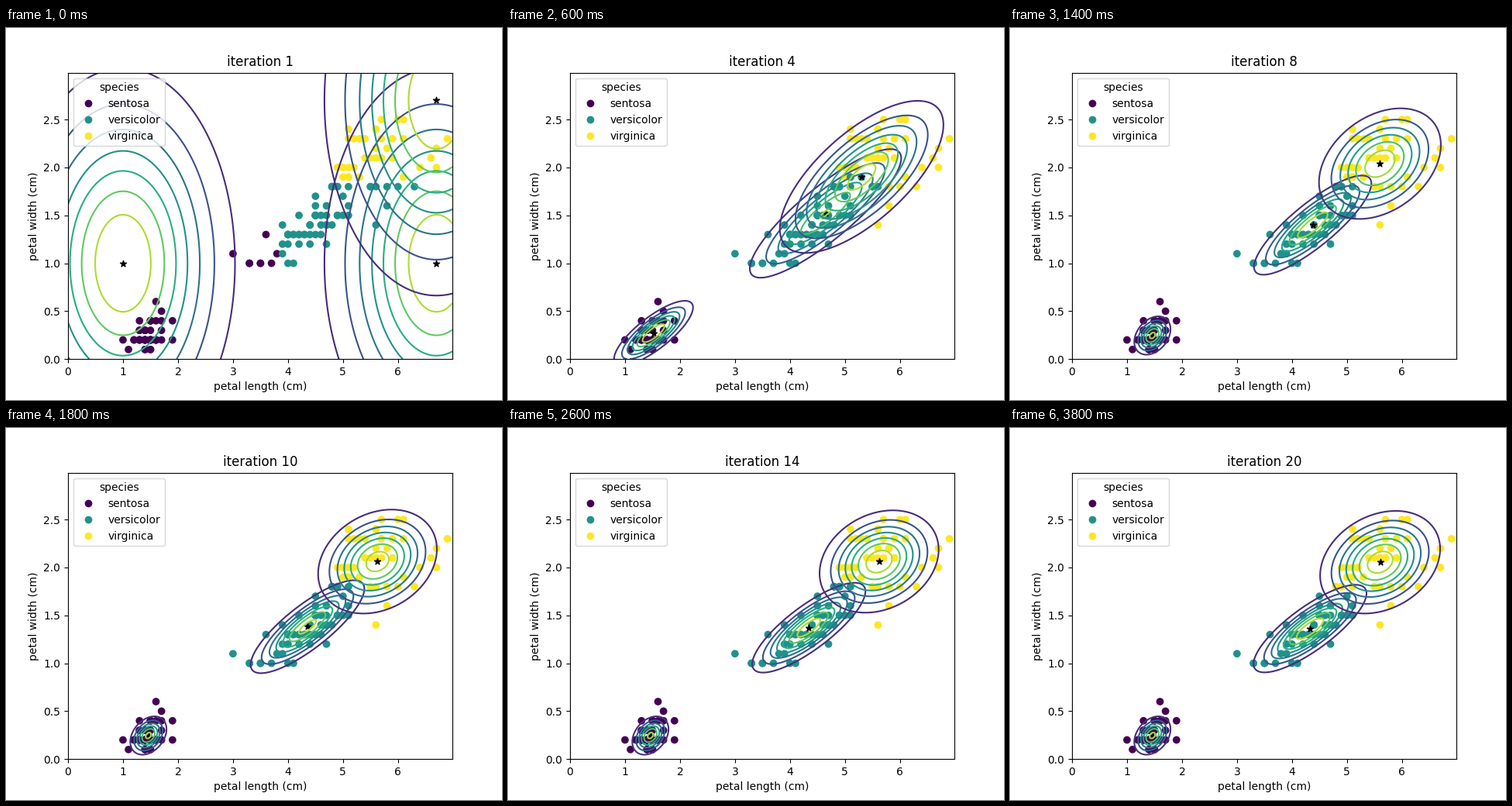
Animation, 640 px wide and 480 px high, one loop 4 s. Source, as a matplotlib script:

```python
import numpy as np
import matplotlib.pyplot as plt
from matplotlib.animation import FuncAnimation

STEPS = 20
NAMES = ["sentosa", "versicolor", "virginica"]

# petal length -> petal widths, both in millimetres
SENTOSA = {
    10: [2], 11: [1], 12: [2] * 2, 13: [2] * 4 + [3, 3, 4],
    14: [1] * 2 + [2] * 8 + [3] * 3, 15: [1] * 2 + [2] * 7 + [3] + [4] * 3,
    16: [2] * 5 + [4, 6], 17: [2, 3, 4, 5], 19: [2, 4],
}
VERSICOLOR = {
    30: [11], 33: [10] * 2, 35: [10] * 2, 36: [13], 37: [10], 38: [11],
    39: [11, 12, 14], 40: [10, 12] + [13] * 3, 41: [10, 13, 13],
    42: [12, 13, 13, 15], 43: [13] * 2, 44: [12, 13, 14, 14],
    45: [13] + [15] * 5 + [16], 46: [13, 14, 15], 47: [12, 14, 14, 15, 16],
    48: [14, 18], 49: [15] * 2, 50: [17], 51: [16],
}
VIRGINICA = {
    45: [17], 48: [18] * 2, 49: [18, 18, 20], 50: [15, 19, 20],
    51: [15, 18, 19, 19, 20, 23, 24], 52: [20, 23], 53: [19, 23],
    54: [21, 23], 55: [18, 18, 21], 56: [14, 18, 21, 22, 24, 24],
    57: [21, 23, 25], 58: [16, 18, 22], 59: [21, 23], 60: [18, 25],
    61: [19, 23, 25], 63: [18], 64: [20], 66: [21], 67: [20, 22], 69: [23],
}

points = np.array([(length, width)
                   for species in (SENTOSA, VERSICOLOR, VIRGINICA)
                   for length, widths in species.items()
                   for width in widths]) / 10


def density(pos, mean, cov):
    d = pos - mean
    q = np.einsum("...i,ij,...j->...", d, np.linalg.inv(cov), d)
    return np.exp(-q / 2) / (2 * np.pi * np.sqrt(np.linalg.det(cov)))


def fit(steps):
    """Expectation maximisation for a mixture of three Gaussians."""
    means = np.array([(1.0, 1.0), (6.7, 1.0), (6.7, 2.7)])
    covs = [np.eye(2)] * 3
    weights = np.full(3, 1 / 3)
    history = []
    for _ in range(steps):
        resp = np.stack([w * density(points, m, c)
                         for w, m, c in zip(weights, means, covs)], axis=1)
        resp /= resp.sum(axis=1, keepdims=True)
        history.append((means, covs, resp.argmax(axis=1)))

        total = resp.sum(axis=0)
        weights = total / len(points)
        means = resp.T @ points / total[:, None]
        covs = []
        for k in range(3):
            d = points - means[k]
            covs.append((resp[:, k, None] * d).T @ d / total[k])
    return history


history = fit(STEPS)
gx, gy = np.meshgrid(np.arange(700) / 100, np.arange(300) / 100)
grid = np.dstack([gx, gy])

fig, ax = plt.subplots(figsize=(6.4, 4.8), dpi=100)


def draw(i):
    means, covs, labels = history[i]
    ax.clear()
    dots = ax.scatter(*points.T, c=labels, cmap="viridis")
    for mean, cov in zip(means, covs):
        ax.contour(gx, gy, density(grid, mean, cov), cmap="viridis")
    ax.scatter(*means.T, c="black", marker="*")
    ax.legend(dots.legend_elements()[0], NAMES, title="species",
              loc="upper left")
    ax.set(title=f"iteration {i + 1}", xlabel="petal length (cm)",
           ylabel="petal width (cm)", xlim=(0, 6.99), ylim=(0, 2.99))


anim = FuncAnimation(fig, draw, frames=STEPS, interval=200,
                     init_func=lambda: None, repeat=True, repeat_delay=0)
plt.show()
```
